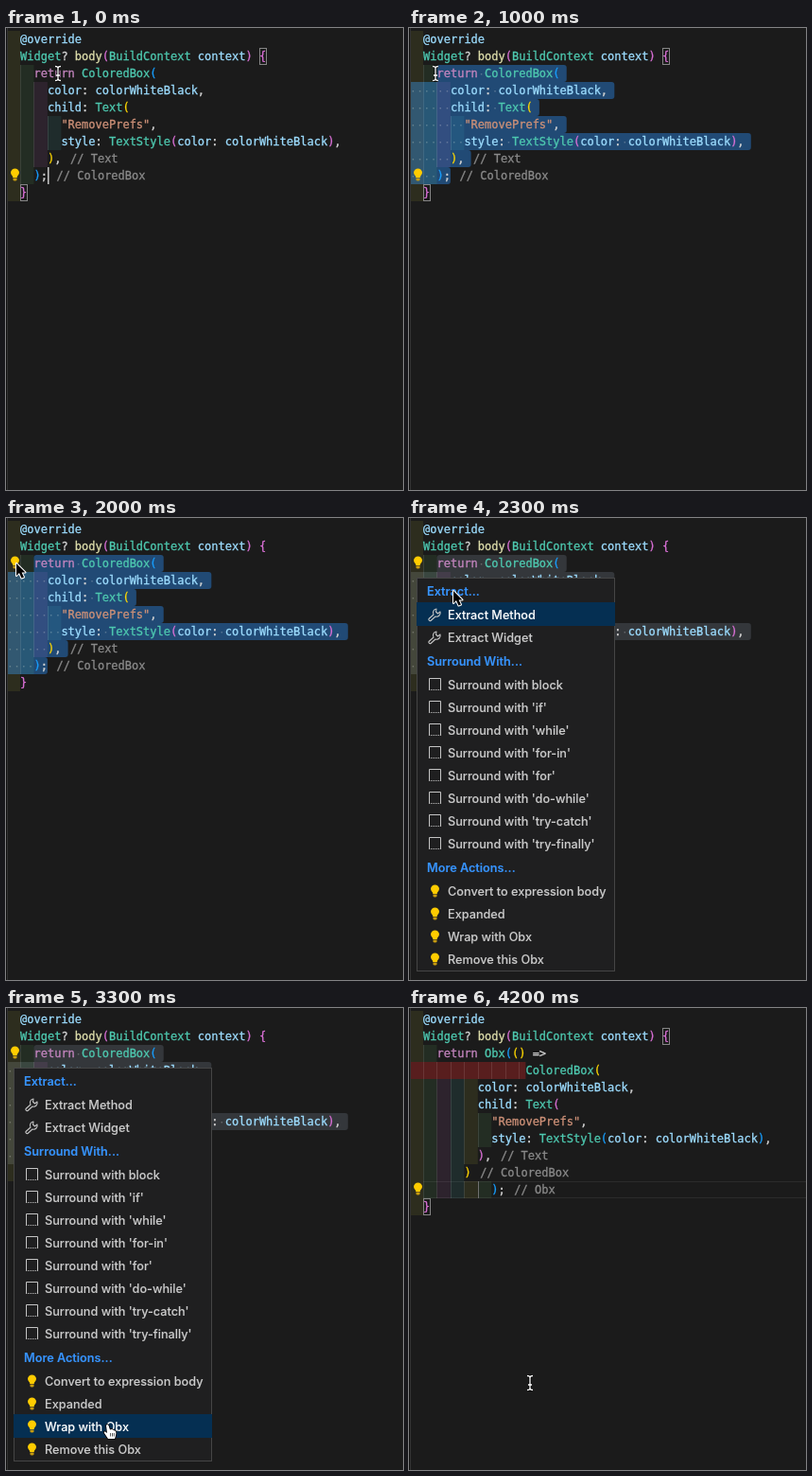
Write an HTML page with a canvas that moves like this. It is 420x488 px and loops after 4.3 s.

```html
<!DOCTYPE html>
<html>
<head>
<meta charset="utf-8">
<style>
html, body { margin: 0; width: 420px; height: 488px; overflow: hidden; background: #1b1b1b; }
canvas { display: block; }
</style>
</head>
<body>
<canvas id="stage" width="420" height="488"></canvas>
<script>
const ctx = document.getElementById('stage').getContext('2d');
const LOOP = 4300, STEP = 100;
const LEFT = 0.6, CHAR = 7.224, ROW = 18, TOP = 3;
const CODE_FONT = '12px "DejaVu Sans Mono", monospace';
const BRACKETS = ['#ffd700', '#da70d6', '#179fff'];
const TINTS = ['rgba(255,255,64,.08)', 'rgba(127,255,127,.08)', 'rgba(255,127,255,.08)', 'rgba(79,236,236,.08)'];

const before = `  @override
  Widget? body(BuildContext context) {
    return ColoredBox(
      color: colorWhiteBlack,
      child: Text(
        "RemovePrefs",
        style: TextStyle(color: colorWhiteBlack),
      ), // Text
    ); // ColoredBox
  }`.split('\n');
const after = `  @override
  Widget? body(BuildContext context) {
    return Obx(() =>
                 ColoredBox(
          color: colorWhiteBlack,
          child: Text(
            "RemovePrefs",
            style: TextStyle(color: colorWhiteBlack),
          ), // Text
        ) // ColoredBox
            ); // Obx
  }`.split('\n');

const menu = [
  ['head', 'Extract...', 77], ['wrench', 'Extract Method', 102], ['wrench', 'Extract Widget', 126],
  ['head', 'Surround With...', 151],
  ...['block', "'if'", "'while'", "'for-in'", "'for'", "'do-while'", "'try-catch'", "'try-finally'"]
    .map((s, i) => ['square', 'Surround with ' + s, 176 + 24 * i]),
  ['head', 'More Actions...', 369],
  ...['Convert to expression body', 'Expanded', 'Wrap with Obx', 'Remove this Obx']
    .map((s, i) => ['bulb', s, 394 + 24 * i]),
];

// Pointer path: time, x, y
const path = [
  [0, 55, 48], [100, 55, 50], [500, 46, 156], [700, 45, 156], [1000, 28, 48], [1300, 28, 48],
  [1600, 28, 76], [1900, 11, 48], [2100, 11, 48], [2300, 47, 77], [2400, 60, 150],
  [2600, 117, 402], [2800, 113, 420], [3000, 107, 440], [3400, 107, 440],
  [3600, 112, 419], [4000, 128, 396], [4300, 128, 396],
];

const colX = col => LEFT + col * CHAR;
const rowY = row => TOP + row * ROW;
const indentOf = line => line.search(/\S/);
const codeLength = line => line.replace(/ \/\/.*/, '').length;

function pointerAt(t) {
  const i = path.findIndex(p => p[0] > t);
  const [a, b] = [path[i - 1], path[i]];
  const u = (t - a[0]) / (b[0] - a[0]), e = u * u * (3 - 2 * u);
  return [a[1] + (b[1] - a[1]) * e, a[2] + (b[2] - a[2]) * e];
}

function rect(x, y, w, h, color) {
  ctx.fillStyle = color;
  ctx.fillRect(x, y, w, h);
}

// A hairline outline gives the slightly heavy text of a desktop editor.
function text(s, x, y, color, weight = 0.3) {
  ctx.fillStyle = ctx.strokeStyle = color;
  ctx.lineWidth = weight;
  ctx.fillText(s, x, y);
  ctx.strokeText(s, x, y);
}

function shape(d, x, y, fill, stroke, width = 1) {
  const p = new Path2D(d);
  ctx.save();
  ctx.translate(x, y);
  ctx.lineJoin = 'round';
  ctx.lineWidth = width;
  if (stroke) { ctx.strokeStyle = stroke; ctx.stroke(p); }
  if (fill) { ctx.fillStyle = fill; ctx.fill(p); }
  ctx.restore();
}

function tokenColor(word) {
  if (word[0] === '"') return '#ce9178';
  if (word.startsWith('//')) return '#8a8a8a';
  if (word === 'return') return '#c586c0';
  if (word === 'body') return '#dcdcaa';
  if (/^[A-Z]/.test(word)) return '#4ec9b0';
  return /^[@a-z]/.test(word) ? '#9cdcfe' : '#d4d4d4';
}

function drawText(lines) {
  let depth = 1;
  ctx.font = CODE_FONT;
  lines.forEach((line, row) => {
    for (const { 0: word, index } of line.matchAll(/"[^"]*"|\/\/.*|@?\w+|\S/g)) {
      let color = tokenColor(word);
      if (/^[({]/.test(word)) color = BRACKETS[depth++ % 3];
      if (/^[)}]/.test(word)) color = BRACKETS[--depth % 3];
      text(word, colX(index) + (word.startsWith('//') ? 2.4 : 0), rowY(row) + 13, color);
    }
  });
}

function drawIndents(lines) {
  lines.forEach((line, row) => {
    const n = indentOf(line), y = rowY(row);
    if (n % 2) rect(LEFT, y, n * CHAR, ROW, 'rgba(128,32,32,.6)');
    for (let c = 0; c < n; c += 2) {
      if (n % 2 === 0) rect(colX(c), y, 2 * CHAR, ROW, TINTS[c / 2 % 4]);
      if (c >= 2) rect(Math.round(colX(c)), y, 1, ROW, 'rgba(255,255,255,.11)');
    }
  });
}

function drawSelection(lines, [x, y], active) {
  const first = Math.max(2, Math.min(8, Math.floor((y - TOP) / ROW)));
  const head = Math.min(Math.round((x - LEFT) / CHAR), codeLength(lines[first]));
  const last = 8, end = 6;
  for (let row = first; row <= last; row++) {
    const from = row === first ? (row === last ? Math.min(head, end) : head) : 0;
    const to = row === last ? end : codeLength(lines[row]) + 1;
    ctx.fillStyle = active ? '#214a75' : '#34373b';
    ctx.beginPath();
    ctx.roundRect(colX(from), rowY(row), (to - from) * CHAR, ROW, [from ? 3 : 0, 3, 3, 0]);
    ctx.fill();
    for (let c = from; c < Math.min(to, codeLength(lines[row])); c++)
      if (lines[row][c] === ' ') rect(colX(c) + 3, rowY(row) + 9, 1.5, 1.5, 'rgba(227,228,226,.28)');
  }
}

function bracketBox(col, row) {
  ctx.strokeStyle = '#858585';
  ctx.lineWidth = 1;
  ctx.strokeRect(Math.round(colX(col)) + .5, rowY(row) + .5, 7, 17);
}

function drawBulb(x, y) {
  shape('M-2.2 3C-2.2 1-4.5 0-4.5-2.2A4.5 4.3 0 0 1 4.5-2.2C4.5 0 2.2 1 2.2 3Z', x, y, '#fc0');
  shape('M-2 3.5H2V5.5Q2 6.5 0 6.5Q-2 6.5-2 5.5Z', x, y, '#c79c10');
}

function drawIcon(kind, y) {
  if (kind === 'bulb') drawBulb(27.5, y);
  if (kind === 'wrench')
    shape('M2-6A4 4 0 0 0-1 0L-6 4.5A1.5 1.5 0 0 0-4 6.5L1 2A4 4 0 0 0 6-3L3.5-1L1.5-3Z', 27, y, null, '#c5c5c5', 1.1);
  if (kind === 'square') {
    shape('M-5.5 5V-6.5H6.5V5', 27, y, null, '#c5c5c5');
    for (let x = 21; x < 34; x += 2) rect(x, y + 5, 1, 1, '#c5c5c5');
  }
}

function drawMenu(pointerY) {
  const focusY = Math.max(102, pointerY);
  rect(8, 63, 210, 416, '#454545');
  rect(9, 64, 208, 414, '#1f1f20');
  for (const [kind, label, y] of menu) {
    const isHead = kind === 'head';
    const focused = !isHead && focusY >= y - 12 && focusY < y + 12;
    if (focused) rect(8, y - 13, 210, 25, '#052f52');
    ctx.font = (isHead ? 600 : 500) + ' 12.7px Inter, sans-serif';
    text(label, isHead ? 19 : 41, y + 4.5, isHead ? '#3794ff' : focused ? '#fff' : '#ccc', 0.1);
    drawIcon(kind, y);
  }
}

function drawPointer(kind, x, y) {
  if (kind === 'beam') {
    const d = 'M-3-7.5Q0-7.5 0-5.5Q0-7.5 3-7.5M0-6V6M-3 7.5Q0 7.5 0 5.5Q0 7.5 3 7.5M-2 2H2';
    shape(d, x, y, null, '#000', 3);
    shape(d, x, y, null, '#fff', 1.3);
  } else if (kind === 'arrow') {
    shape('M0 0V13L3 10L5.5 15.5L8 14.5L5.6 9.5H9.5Z', x, y, '#000', '#fff', 2);
  } else {
    shape('M-1 1Q0-1 1.5 1L3 5.5L5 5L7 6L9 7Q10 9 9 12L8 15H1L-3 9Q-4 7-2 7.5L0 9Z', x, y, '#fff', '#000', 1.6);
    shape('M3.5 9V12.5M5.5 9V12.5M7.3 9V12.5', x, y, null, '#333', .8);
  }
}

function draw(t) {
  const wrapped = t >= 3400, menuOpen = t >= 2100 && !wrapped;
  const lines = wrapped ? after : before;
  const mouse = pointerAt(t);

  rect(0, 0, 420, 488, '#1b1b1b');
  if (wrapped) {
    rect(15, rowY(10), 405, 1, '#2b2b2b');
    rect(15, rowY(10) + 17, 405, 1, '#2b2b2b');
  }
  if (t >= 700 && !wrapped) drawSelection(lines, t < 1000 ? mouse : [28, 48], !menuOpen);
  drawIndents(lines);
  rect(0, 0, 1, 488, '#111');
  rect(1, 0, 1, 488, '#333');
  if (wrapped) rect(73, rowY(10), 1, ROW, '#707070');
  drawText(lines);

  if (t < 1300 || t >= 3700) {
    bracketBox(37, 1);
    bracketBox(2, lines.length - 1);
  }
  if (t < 700) rect(44, rowY(8), 1.5, ROW, '#c8c8c8');
  if (!wrapped || t >= 3800) drawBulb(9.5, rowY(wrapped ? 10 : t < 1300 ? 8 : 2) + 8);
  if (menuOpen) drawMenu(mouse[1]);

  const kind = menuOpen ? (mouse[1] < 90 ? 'arrow' : 'hand') : t >= 1800 && !wrapped ? 'arrow' : 'beam';
  drawPointer(kind, ...mouse);
}

function tick() {
  draw(Math.floor(performance.now() % LOOP / STEP) * STEP);
  requestAnimationFrame(tick);
}
tick();
</script>
</body>
</html>
```
